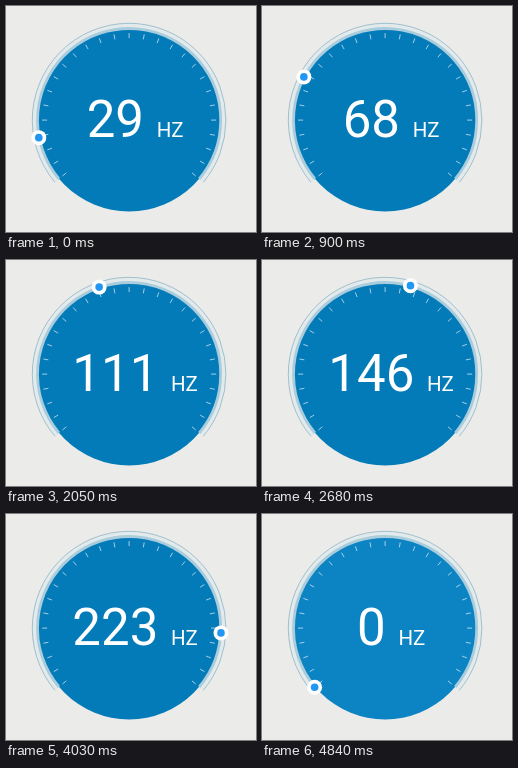
Animation, 250 px wide and 226 px high, one loop 5.96 s. Source, as an HTML page with a canvas:

```html
<!DOCTYPE html>
<html lang="en">
<head>
<meta charset="utf-8">
<title>Frequency dial</title>
<style>
html, body { margin: 0; width: 100%; height: 100%; overflow: hidden; background: #ebebe9; }
canvas { display: block; width: 250px; height: 226px; }
</style>
</head>
<body>
<canvas id="dial"></canvas>
<script>
const W = 250, H = 226, CX = 123.1, CY = 114.1;
const LOOP = 5960, RESET = 4840;
const START = 140, SWEEP = 260;
const canvas = document.getElementById('dial');
const ctx = canvas.getContext('2d');
const ratio = window.devicePixelRatio || 1;
canvas.width = W * ratio;
canvas.height = H * ratio;
ctx.scale(ratio, ratio);

// The drag changes speed at these [step, frequency] points
const drag = [
  [0, 29], [2, 44], [6, 68], [10, 86], [13, 102],
  [17, 136], [19, 146], [24, 195], [29, 223], [33, 260]
];

// The reading updates in steps: nine slow ones, then slightly faster
function stepAt(t) {
  return t < 1350 ? Math.floor(t / 150) : 9 + Math.floor((t - 1335) / 134.2);
}

function frequencyAt(t) {
  if (t >= RESET) return 0;
  const step = Math.min(stepAt(t), 33);
  const i = drag.findIndex(([s]) => s >= step);
  const [s1, f1] = drag[i];
  const [s0, f0] = drag[Math.max(i - 1, 0)];
  return s1 === step ? f1 : Math.round(f0 + (f1 - f0) * (step - s0) / (s1 - s0));
}

const rad = deg => deg * Math.PI / 180;

function point(deg, r) {
  return [CX + r * Math.cos(rad(deg)), CY + r * Math.sin(rad(deg))];
}

function disc(x, y, r, color) {
  ctx.fillStyle = color;
  ctx.beginPath();
  ctx.arc(x, y, r, 0, 2 * Math.PI);
  ctx.fill();
}

function ring(inner, outer, color) {
  ctx.strokeStyle = color;
  ctx.lineWidth = outer - inner;
  ctx.beginPath();
  ctx.arc(CX, CY, (inner + outer) / 2, rad(START), rad(START + SWEEP));
  ctx.stroke();
}

function drawTicks() {
  ctx.strokeStyle = 'rgba(255,255,255,0.7)';
  ctx.lineWidth = 0.9;
  ctx.beginPath();
  for (let a = START; a <= START + SWEEP; a += 10) {
    ctx.moveTo(...point(a, 82));
    ctx.lineTo(...point(a, 87));
  }
  ctx.stroke();
}

function drawReading(value) {
  const text = String(value);
  ctx.fillStyle = '#fff';
  ctx.textAlign = 'center';
  ctx.font = '400 51px Roboto, sans-serif';
  ctx.fillText(text, 109.3, 131);
  ctx.textAlign = 'left';
  ctx.font = '400 20.5px Roboto, sans-serif';
  ctx.fillText('HZ', 122.3 + 14.2 * text.length, 131);
}

function draw(value) {
  ctx.fillStyle = '#ebebe9';
  ctx.fillRect(0, 0, W, H);
  disc(CX, CY, 91.4, value ? '#047bb9' : '#0c84c3');
  ring(92.6, 96.4, '#e2eaec');
  ring(90.2, 93, '#a9cddd');
  ring(96.4, 97.2, '#8fb4c4');
  drawTicks();
  drawReading(value);
  const [x, y] = point(START + value, 92);
  disc(x, y, 7.5, '#fff');
  disc(x, y, 3.8, '#2196f3');
}

function frame(now) {
  draw(frequencyAt(now % LOOP));
  requestAnimationFrame(frame);
}

draw(frequencyAt(0));
requestAnimationFrame(frame);
</script>
</body>
</html>
```
